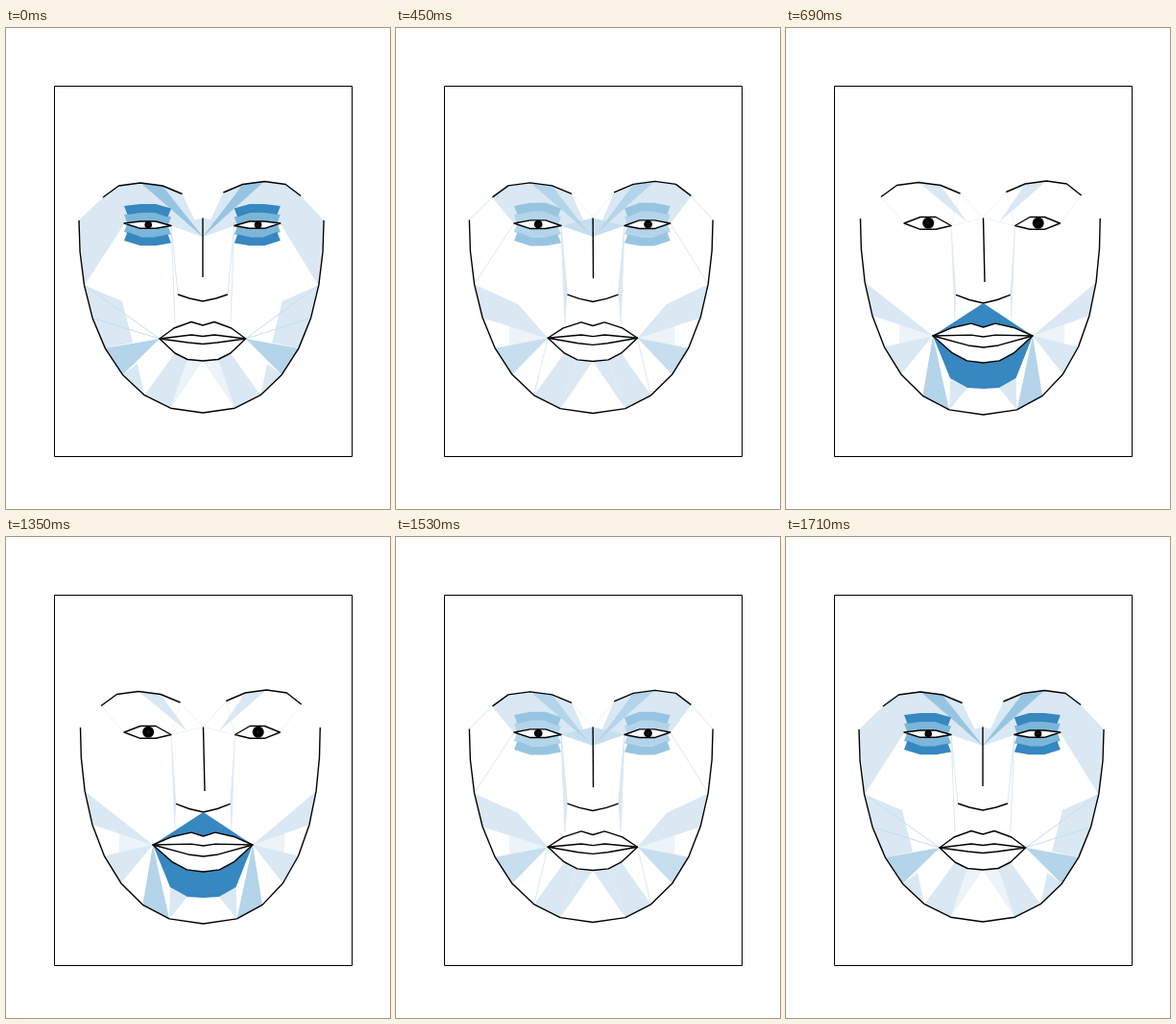
An HTML page with a canvas for the animation above (2040 ms loop, 400 by 500 pixels).

```html
<!DOCTYPE html>
<html lang="en">
<head>
<meta charset="utf-8">
<title>Faceted face</title>
<style>
  html, body { margin: 0; width: 100%; height: 100%; overflow: hidden; background: #fff; }
  canvas { display: block; width: 400px; height: 500px; }
</style>
</head>
<body>
<canvas id="stage" width="400" height="500"></canvas>
<script>
const ctx = document.getElementById('stage').getContext('2d');
const LOOP = 2040, STEP = 60, STEPS = 5, SMILE_AT = 330, REST_AT = 1350;

const mix = (a, b, t) => a + (b - a) * t;
const points = text => text.split(' ').map(p => p.split(',').map(Number));

// Jaw: a superellipse whose corners crowd towards the temple.
function jaw(t) {
  const power = 2 / mix(2.2, 2.25, t), crowd = mix(1.18, 1.23, t), top = mix(200, 198, t);
  return Array.from({ length: 9 }, (_, i) => {
    const angle = Math.PI / 2 * (i / 8) ** crowd;
    const across = Math.max(0, Math.cos(angle)) ** power;
    return [205 + t / 2 - mix(129, 128, t) * across,
      top + mix(200, 204, t) * Math.sin(angle) ** power];
  });
}

// A smile lowers the middle and pulls the sides outwards and up.
const smile = (list, t) => list.map(([x, y]) => {
  const d = ((205 - x) / 45) ** 2;
  return [x + t * (0.5 - 7.5 * d), y + t * (2 - 5 * d)];
});

// Left half: o jaw, b brow, e eye, n nose, w nostrils, m mouth, l lips, k brow crease.
function leftHalf(t) {
  const upper = mix(201, 196.5, t), lower = mix(208.3, 209.3, t), gap = 1.5 * t;
  return {
    o: jaw(t),
    b: points('101,176 117.5,164 140,161 163,164 183.5,172.5').map(([x, y]) => [x - 2 * t, y - t / 2]),
    e: [[123, 203], [140, upper], [156, upper], [172, 205.5], [156, lower], [140, lower]],
    n: [[205 + t / 2, 197.5], [205 + 2 * t, 259 + 5 * t]],
    w: smile(points('179,277 191,281 205,284'), t),
    m: smile(points('160,323 175,312 193,305.5 205,309 205,346 189,344.5 176,338'), t),
    l: smile([[205, 320.5 - gap], [193, 319 - gap], [190, 327 + gap], [205, 328.5 + gap]], t),
    k: [[205 - 16 * t, 217 - 15 * t]]
  };
}

// The right half is the left one mirrored, slightly narrower at the edge.
const mirror = ([x, y], t) =>
  [410 + t - x - mix(3, 6.5, t) * ((205 - x) / 130) ** 2, y];

function rightHalf(left, t) {
  const half = {};
  for (const key in left) half[key] = left[key].map(p => mirror(p, t));
  half.b = half.b.map(([x, y]) => [x, y - 1.5]);
  return half;
}

// Depth of blue at rest, early in the smile and in full smile, then the corners.
const facets = [
  '200 o0 b0 e0 o2',
  '220 b0 b1 b2 k0 e3 e0',
  '220 b3 b4 k0',
  '230 e3 n0 205,217',
  '542 b2 b3 k0',
  '022 e3 w0 176,307',
  '200 o2 121,284 132,327 o4 o3',
  '011 118,307 m0 118,330',
  '020 o2 127,287 m0 o3',
  '002 o2 m0 o3',
  '432 o4 m0 o5',
  '200 o5 137,349 o6',
  '220 o6 m6 m5 o7',
  '120 m5 m4 o7',
  '002 171,364 189,374 o7',
  '004 o6 m0 o7',
  '221 b0 e0',
  '220 o2 e0',
  '020 o0 b0',
  '011 b4 n0',
  '001 b4 e3',
  '001 e3 n0',
  '221 e3 w0',
  '221 e3 176,307',
  '300 o2 m0',
  '320 o3 m0',
  '020 o6 m0'
];
const glow = ['w2 m0 m1 m2 m3', 'm4 m5 m6 m0 171,364 189,374 205,375'];

const EARLY = 0.256;
const RAMP = [[218, 232, 244], [218, 232, 244], [180, 212, 233], [122, 182, 217], [55, 135, 192]];

// Depths come in half steps of the ramp; below one full step the blue fades out.
function tint(depths, t) {
  const [rest, early, full] = [...depths].map(d => d / 2);
  const depth = t < EARLY ? mix(rest, early, t / EARLY) : mix(early, full, (t - EARLY) / (1 - EARLY));
  const i = Math.min(3, Math.floor(depth));
  const rgb = RAMP[i].map((v, c) => mix(v, RAMP[i + 1][c], depth - i));
  return `rgba(${rgb},${Math.min(1, depth)})`;
}

function resolve(path, half, t) {
  return path.split(' ').map(token => {
    if (!token.includes(',')) return half[token[0]][token[1]];
    const point = points(token)[0];
    return half.right ? mirror(point, t) : point;
  });
}

function trace(list, closed) {
  ctx.beginPath();
  list.forEach(([x, y]) => ctx.lineTo(x, y));
  if (closed) ctx.closePath();
}

function stroke(list, closed = false, color = '#000', width = 1.4) {
  trace(list, closed);
  ctx.strokeStyle = color;
  ctx.lineWidth = width;
  ctx.stroke();
}

function fill(list, color) {
  trace(list, true);
  ctx.fillStyle = color;
  ctx.fill();
}

function drawFacet(facet, half, t) {
  const color = tint(facet.slice(0, 3), t);
  const list = resolve(facet.slice(4), half, t);
  if (list.length > 2) fill(list, color);
  else stroke(list, false, color, 1);
}

// Two bands above and two below the eye, each narrowing towards it.
function drawLids(eye, t) {
  const middle = (eye[0][0] + eye[3][0]) / 2;
  const shift = (edge, dy, narrow) =>
    edge.map(([x, y]) => [middle + (x - middle) * narrow, y + dy]);
  for (const side of [-1, 1]) {
    const edge = (side < 0 ? [0, 1, 2, 3] : [0, 5, 4, 3]).map(i => eye[i]);
    ['640', '850'].forEach((depths, i) => {
      const near = shift(edge, side * 9 * i, 0.86), far = shift(edge, side * 9 * (i + 1), 1);
      fill([...far, ...near.reverse()], tint(depths, t));
    });
  }
}

function drawEye(eye, t) {
  fill(eye, '#fff');
  stroke(eye, true);
  const x = (eye[0][0] + eye[3][0]) / 2 + 0.7, y = mix(204.5, 202.7, t);
  for (const [radius, color] of [[mix(3.8, 6, t), '#000'], [1.6, '#2a0c0c']]) {
    ctx.beginPath();
    ctx.arc(x, y, radius, 0, Math.PI * 2);
    ctx.fillStyle = color;
    ctx.fill();
  }
}

function draw(t) {
  const left = leftHalf(t);
  const right = { ...rightHalf(left, t), right: true };
  const both = [left, right];
  const whole = path => [...resolve(path, left, t), ...resolve(path, right, t).reverse()];

  ctx.fillStyle = '#fff';
  ctx.fillRect(0, 0, 400, 500);
  ctx.lineJoin = 'round';

  for (const half of both) {
    facets.forEach(facet => drawFacet(facet, half, t));
    drawLids(half.e, t);
  }
  glow.forEach(path => fill(whole(path), tint('008', t)));

  const mouth = whole('m3 m2 m1 m0 m6 m5 m4');
  fill(mouth, '#fff');
  stroke(mouth, true);
  stroke(whole('l0 l1 m0 l2 l3'), true);
  stroke(whole('o0 o1 o2 o3 o4 o5 o6 o7 o8'));
  stroke(whole('w0 w1 w2'));
  stroke(left.n);
  for (const half of both) {
    stroke(half.b);
    drawEye(half.e, t);
  }

  ctx.lineWidth = 1;
  ctx.strokeRect(50.5, 60.5, 310, 385);
}

const ease = u => u < 0.5 ? 4 * u ** 3 : 1 - 4 * (1 - u) ** 3;
const progress = ms => Math.min(STEPS, Math.max(0, Math.floor(ms / STEP))) / STEPS;

function pose(ms) {
  return ms < REST_AT ? ease(progress(ms - SMILE_AT)) : 1 - ease(progress(ms - REST_AT));
}

const start = performance.now();
function tick() {
  draw(pose((performance.now() - start) % LOOP));
  requestAnimationFrame(tick);
}
tick();
</script>
</body>
</html>
```
